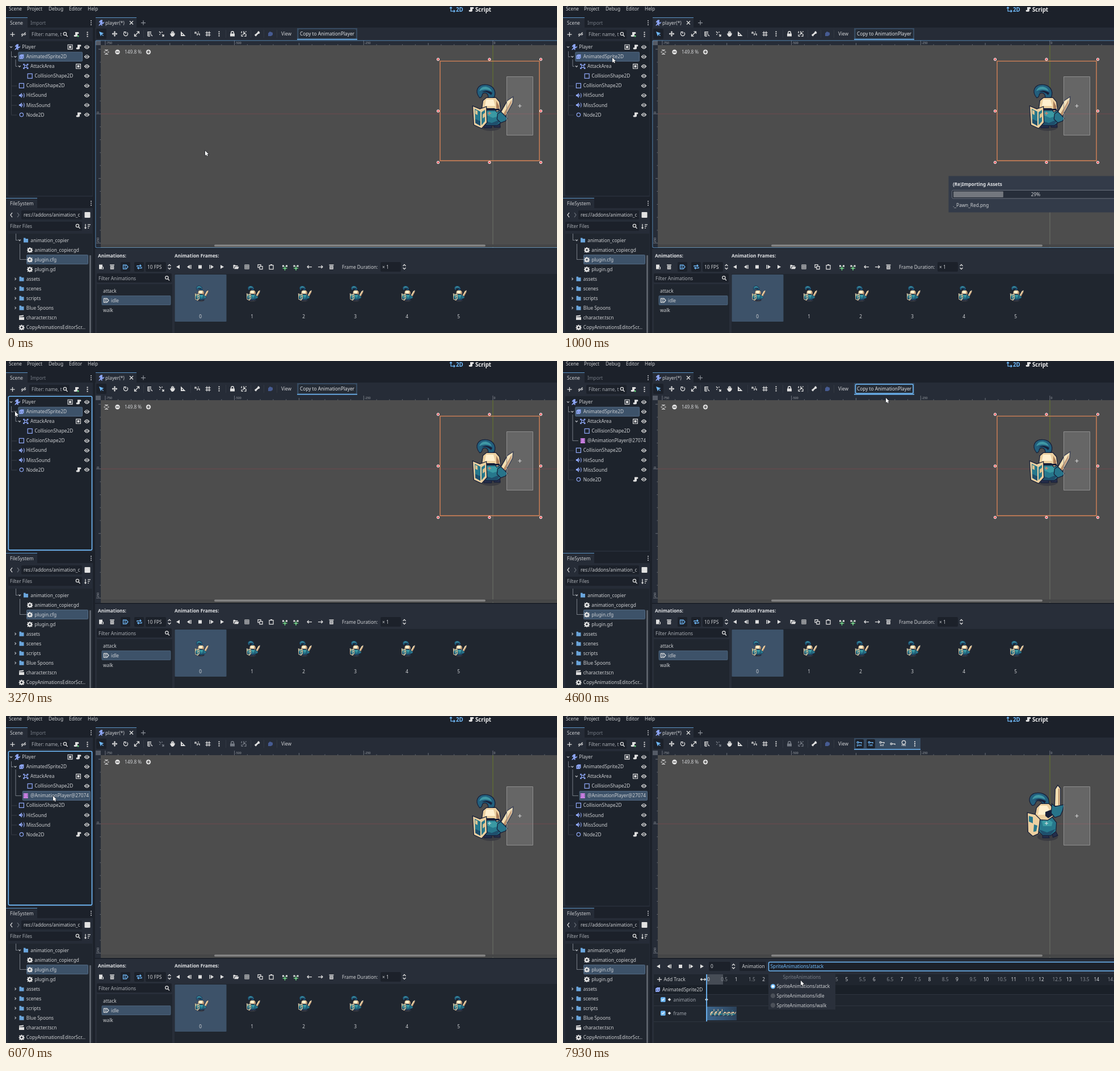
Write an HTML page with a canvas that moves like this. It is 971 px wide and 576 px high and loops after 8 s.

```html
<!DOCTYPE html>
<html lang="en">
<head>
<meta charset="utf-8">
<title>Editor walkthrough</title>
<style>
html, body { margin: 0; width: 100%; height: 100%; overflow: hidden; background: #1c212a }
canvas { display: block }
</style>
</head>
<body>
<canvas id="stage" width="971" height="576"></canvas>
<script>
const g = document.getElementById('stage').getContext('2d');
const LOOP = 8000, STEP = 1000 / 15;
const OUTER = '#1c212a', PANEL = '#262c37', DARK = '#1d232c', LOWER = '#20262f', TEXT = '#cdcfd2', ICON = '#e0e0e0',
  DIM = '#747a84', BLUE = '#70bafa', NODE = '#8da5f3', SELECT = '#3d5269', FOLDER = '#6aa5dc', TAB_LINE = '#5b94c6';
const FONT = '8.29px "Noto Sans", sans-serif', BOLD = 'bold ' + FONT,
  BIG = 'bold 9.7px "Noto Sans", sans-serif', TINY = '5.2px "Noto Sans", sans-serif';

// Icons are centred on 0,0. A path ending in Z is filled, any other is stroked.
const icons = {
  plus: 'M-4 0H4M0-4V4',
  link: 'M-1 1L-3.5 3.5M1-1L3.5-3.5M-4 1L-1.5-1.5M4-1L1.5 1.5M-1.5 1.5L1.5-1.5',
  search: 'M2-1A2.6 2.6 0 1 1-3.2-1A2.6 2.6 0 1 1 2-1M1.2 1L4 4',
  script: 'M-2-4H3Q5-4 4-1H2V2Q2 4 0 4H-3Q-5 4-4 1H-2Z',
  dots: 'M-1-4.5h2v2h-2ZM-1-1h2v2h-2ZM-1 2.5h2v2h-2Z',
  eye: 'M-4.8 0Q0-7 4.8 0Q0 7-4.8 0ZM2.4 0A2.4 2.4 0 1 0-2.4 0A2.4 2.4 0 1 0 2.4 0ZM1.2 0A1.2 1.2 0 1 0-1.2 0A1.2 1.2 0 1 0 1.2 0Z',
  group: 'M-4.5-4.5h9v9h-9ZM-3.4-3.4v6.8h6.8v-6.8ZM-2-2h4v4h-4Z',
  rect: 'M-4-4H4V4H-4V-4.6',
  ring: 'M3.2 0A3.2 3.2 0 1 0-3.2 0A3.2 3.2 0 1 0 3.2 0',
  area: 'M-4-2V-4H-2M2-4H4V-2M4 2V4H2M-2 4H-4V2M-2-2H2V2H-2V-2M-4-4L-2-2M4-4L2-2M4 4L2 2M-4 4L-2 2',
  person: 'M-1-5h3v3h-1l2 2 2-2v2l-2 2h-2l1 3h-2l-1-2-2 2h-2l3-4v-2l-2 1v-2Z',
  sprite: 'M-4-2L-1-4H4V2L2 4H-4ZM-2.5 0v1.5h1.2v-1.5ZM1 0v1.5h1.2v-1.5Z',
  sound: 'M-4.5-1.5h2l3-3v9l-3-3h-2ZM1.5-2.5Q4 0 1.5 2.5ZM3-4Q6 0 3 4L4 4Q7 0 4-4Z',
  film: 'M-4-4.5h8v9h-8ZM-3.4-3v1h1v-1ZM-3.4 0v1h1v-1ZM2.4-3v1h1v-1ZM2.4 0v1h1v-1Z',
  down: 'M-2-1L0 1L2-1', right: 'M-1-2L1 0L-1 2', left: 'M2-4L-1 0L2 4', next: 'M-1-4L2 0L-1 4',
  close: 'M-3-3L3 3M3-3L-3 3',
  arrow: 'M-4-4L4.5-1L1 .5L4 3L3 4L.5 1L-1 4.5Z',
  move: 'M0-5L2-2.4H.7V-.7H2.4V-2L5 0L2.4 2V.7H.7V2.4H2L0 5L-2 2.4H-.7V.7H-2.4V2L-5 0L-2.4-2V-.7H-.7V-2.4H-2Z',
  turn: 'M-2-3A3.6 3.6 0 1 0 2.5-2.6M-3.5-3.5H0V0',
  scale: 'M0-4H4V0M4-4L-4 4M-4 0V4H0',
  list: 'M-4-3.5H2M-4-1H2M-4 1.5H0M-4 4H0M-4-4V4M1 1L4 4',
  pivot: 'M-4-4L-1-1M1-4V-2M-4 1H-2M1 1L4 4M4 1V4H1',
  hand: 'M-4 0l1-1 1 1v-4h1.3v3h.5v-4h1.4v4h.5v-3h1.3v4l.6-1.5h1V1Q3 5 0 5Q-2 5-4 0Z',
  ruler: 'M-4-4.5L4.5 4H-4ZM-2-.5V2H.5Z',
  snap: 'M-4 0v-3h2v3M0 3V0h4v3M2-4v2',
  grid: 'M-4.5-2H4.5M-4.5 2H4.5M-2-4.5V4.5M2-4.5V4.5',
  lock: 'M-4-.5h1v-1.5a3 3 0 0 1 6 0v1.5h1v5h-8ZM-1.6-.5h3.2v-1.5a1.6 1.6 0 0 0-3.2 0Z',
  ungroup: 'M-4-4h1M-1-4h2M3-4h1v1M-4-4v3M4 0v4h-3M-4 1v3h3M-2 2L2-2M-1-2H2V1',
  bone: 'M1-4Q4-6 4-3Q6-2 3.5 0L2 0L-1 3Q-1 5-3 4Q-5 3-4 1L-2 0L1-3Z',
  poly: 'M-4-1L-1-4L4-2V2L1 4H-4Z',
  focus: 'M-4.5 0H-1.8M4.5 0H1.8M0-4V-1.5M0 4V1.5M-3-3.5H3M-3 3.5H3',
  gear: 'M-1-4.5h2v1.2l1.4.6 1-.9 1.3 1.3-1 1 .5 1.3h1.1v1.6H4L3.5 2.6l1 1-1.2 1.2-1.1-.9L1 4.4v.6h-2v-.6l-1.2-.5-1.1.9-1.2-1.2 1-1L-4 1.3h-1v-1.6h1l.5-1.2-1-1 1.3-1.3 1 .9L-1-3.3ZM1.6.2A1.6 1.6 0 1 0-1.6.2A1.6 1.6 0 1 0 1.6.2Z',
  folder: 'M-4-4H-.5V-2.5H4V4H-4Z',
  clap: 'M-4.5-3.5L3.5-4.5V-2.5L-4.5-1.5ZM-4.5-1H4.5V4H-4.5Z',
  sort: 'M-4-4V4M-5.5 2L-4 4L-2.5 2M0-3H5M0 0H3.5M0 3H2',
  add: 'M-4-4H2V0H4V4H-4ZM1 1V3H3V1Z',
  trash: 'M-4-4h8v1.4h-8ZM-3.2-1.8h6.4v6h-6.4ZM-1.6-.8v4h.8v-4ZM.8-.8v4h.8v-4Z',
  tag: 'M-4-3.5H1.5L4.5 0L1.5 3.5H-4V-4M-2-1.3H1M-2 1.3H1',
  loop: 'M-4 0V-2H3M1-4L3-2L1 0M4 0V2H-3M-1 0L-3 2L-1 4',
  back: 'M3-3.5V3.5L-3 0Z', play: 'M-3-3.5V3.5L3 0Z',
  stepBack: 'M1-3.5V3.5L-4 0ZM2-3.5h1.5v7h-1.5Z', step: 'M-1-3.5V3.5L4 0ZM-3.5-3.5h1.5v7h-1.5Z',
  stop: 'M-3-3H3V3H-3Z', open: 'M-4.5-3.5h3l1 1h4v1.5h-5.5l-1.5 4h-1ZM-1-.3H5.5L4 3.8H-3Z',
  table: 'M-4-4h8v8h-8ZM-3-3v1.6h1.6v-1.6ZM-.8-3v1.6h1.6v-1.6ZM1.4-3v1.6h1.6v-1.6ZM-3-.8v1.6h1.6v-1.6ZM-.8-.8v1.6h1.6v-1.6ZM1.4-.8v1.6h1.6v-1.6ZM-3 1.4v1.6h1.6v-1.6ZM-.8 1.4v1.6h1.6v-1.6ZM1.4 1.4v1.6h1.6v-1.6Z',
  copy: 'M-1-1H4V4H-1V-1.6M-1 1H-4V-4H1V-1', paste: 'M-3.5-3H3.5V4H-3.5V-3.6M-1.5-4H1.5',
  insert: 'M-4.5-3h3v3h-3ZM1.5-3h3v3h-3ZM-.7 1h1.4v1.2h1.3v1.4h-1.3v1.2h-1.4v-1.2h-1.3v-1.4h1.3Z',
  toLeft: 'M4 0H-4M-1.5-2.5L-4 0L-1.5 2.5', toRight: 'M-4 0H4M1.5-2.5L4 0L1.5 2.5',
  both: 'M-4 0H4M-2.4-2L-4.4 0L-2.4 2M2.4-2L4.4 0L2.4 2',
  spin: 'M-2.5-1.5L0-4L2.5-1.5M-2.5 1.5L0 4L2.5 1.5',
  gem: 'M0-2.8L2.8 0L0 2.8L-2.8 0Z', key: 'M-4 0A1.5 1.5 0 1 0-1 0A1.5 1.5 0 1 0-4 0M-1 0H4V2',
  check: 'M-2-.2L-.6 1.4L2.2-1.8', axes: 'M-3-4V3H4M-5-2L-3-4L-1-2M2 1L4 3L2 5',
  mouse: 'M0 0V8.4L2 6.7L3.3 9.4L4.7 8.7L3.5 6H6Z'
};
const shapes = {};
for (const n in icons) shapes[n] = new Path2D(icons[n]);

function box(x, y, w, h, fill, line, r = 0) {
  g.beginPath(); g.roundRect(x, y, w, h, r);
  if (fill) { g.fillStyle = fill; g.fill() }
  if (line) { g.strokeStyle = line; g.stroke() }
}
function text(s, x, y, color = TEXT, font = FONT, align = 'left') {
  g.font = font; g.fillStyle = color; g.textAlign = align; g.fillText(s, x, y + 3);
}
function icon(name, x, y, color = ICON) {
  g.save(); g.translate(x, y); g.lineWidth = 1.25;
  g.fillStyle = g.strokeStyle = color;
  icons[name].endsWith('Z') ? g.fill(shapes[name], 'evenodd') : g.stroke(shapes[name]);
  g.restore();
}
const iconRow = (y, row, color) => { for (const n in row) [].concat(row[n]).forEach(x => icon(n, x, y, color)) };
function disc(x, y, r, fill, line) {
  g.beginPath(); g.arc(x, y, r, 0, 7);
  g.fillStyle = fill; g.fill();
  if (line) { g.strokeStyle = line; g.stroke() }
}
function tab(x, y, w, label) {
  box(x, y, w, 18, PANEL); box(x, y, w, 1, TAB_LINE);
  text(label, 7, y + 9.5);
}

const INK = '#182039', TEAL = '#27788c', CREAM = '#ecd0a0';
// Layers of colour and path; a third value leaves out the dark outline.
const poses = [[
  ['#252e4b', 'M842 207H855V214H843ZM860 207H870V213H861Z'],
  ['#235f7d', 'M835 161C826 150 832 139 844 139C857 139 864 149 860 160L850 163C852 155 846 151 841 153C837 155 840 160 835 161Z'],
  ['#3f97a4', 'M834 150Q837 141 846 142Q854 144 856 150Q844 144 834 150Z', 1],
  [INK, 'M838 152Q846 146 857 153L855 157Q847 149 838 152Z', 1],
  [TEAL, 'M839 188L846 181H868L875 190L873 204L865 210H847L840 203Z'],
  ['#3a9aa3', 'M844 186H866L871 193L858 197L846 192Z', 1],
  ['#1f4f6c', 'M841 201L856 206L873 199L865 210H847Z', 1],
  [CREAM, 'M839 182L841 167L847 162H863L869 169L871 183L865 186L861 180H847Z'],
  ['#fff0cf', 'M846 165H859L862 176H844Z', 1],
  ['#a77b59', 'M864 167L869 176V183L864 180Z', 1],
  [INK, 'M841 181H870V184H841Z', 1],
  [CREAM, 'M823 177L835 182L846 178L847 205L838 215L825 209Z'],
  [TEAL, 'M826 181L836 186V211L827 206ZM838 187L844 183V203L838 210Z', 1],
  ['#d9c08f', 'M827 183L831 185V192L827 190ZM840 191L844 188V195L840 198Z', 1],
  ['#1f4f6c', 'M827 199L836 203V211L827 206Z', 1],
  ['#f3deb1', 'M871 190L884 167L893 161L892 171L879 195Z'],
  ['#b98e68', 'M876 191L891 165V171L879 194Z', 1],
  ['#27748a', 'M867 190L872 187L883 198L880 202L872 205L866 199Z']
], [
  ['#252e4b', 'M846 206H853L856 214H846ZM862 204H868L871 210L864 213Z'],
  ['#235f7d', 'M827 157C818 147 824 136 837 136C850 136 857 144 856 156L846 160C847 152 841 147 835 149C831 151 833 157 827 157Z'],
  ['#3f97a4', 'M827 147Q830 138 839 139Q848 140 850 147Q837 141 827 147Z', 1],
  [INK, 'M831 149Q839 143 851 150L849 154Q840 146 831 149Z', 1],
  [TEAL, 'M838 187L845 179H862L869 188L868 203L859 210H846L838 202Z'],
  ['#3a9aa3', 'M844 186L852 180L863 187L861 194H846Z', 1],
  ['#1f4f6c', 'M839 200L853 205L868 199L859 210H846Z', 1],
  [CREAM, 'M832 177L835 162L842 155H856L863 162L864 176L854 183L838 182Z'],
  ['#fff0cf', 'M840 158H853L857 165L848 174H837Z', 1],
  [INK, 'M850 169L863 164V175L855 180L850 176Z', 1],
  [CREAM, 'M819 171L832 174L840 182L837 207L828 211L820 204Z'],
  [TEAL, 'M821 176L828 178V189L821 186ZM830 191L836 193L834 203L829 204Z', 1],
  ['#f3deb1', 'M867 158L868 129L872 123L876 128V158Z'],
  ['#b98e68', 'M873 128H875V157H873Z', 1],
  ['#27748a', 'M862 156L867 160L882 157L880 166L876 175L867 178L861 171Z']
]].map(p => p.map(([color, d, plain]) => [color, new Path2D(d), plain]));

function knight(x, y, scale, pose = 0) {
  g.save();
  g.translate(x, y); g.scale(scale, scale); g.translate(-856, -180);
  g.fillStyle = '#3b3c42';
  g.beginPath(); g.ellipse(854, 213, 18, 7, 0, 0, 7); g.fill();
  g.lineWidth = 2.6; g.strokeStyle = INK;
  for (const [color, path, plain] of poses[pose]) {
    if (!plain) g.stroke(path);
    g.fillStyle = color; g.fill(path);
  }
  g.restore();
}

function cross(x, y, color) {
  box(x - 3, y - .5, 6, 1, color); box(x - .5, y - 3, 1, 6, color);
}

function topBar() {
  box(0, 0, 971, 576, OUTER);
  [['Scene', 5], ['Project', 37], ['Debug', 75], ['Editor', 111], ['Help', 144]].forEach(([s, x]) => text(s, x, 5.4));
  icon('axes', 787, 6, BLUE); text('2D', 793, 6.5, BLUE, BIG);
  icon('script', 820, 6); text('Script', 827, 6.5, '#f0f0f0', BIG);
}

// name, icon, depth, colour, has arrow, extra icons
function sceneRows(s) {
  const rows = [
    ['Player', 'person', 0, NODE, 1, { group: 113, script: 128 }],
    ['AnimatedSprite2D', 'sprite', 1, NODE, 1, {}],
    ['AttackArea', 'area', 2, NODE, 1, { group: 127.5 }],
    ['CollisionShape2D', 'rect', 3, NODE, 0, {}],
    ['@AnimationPlayer@27074', 'film', 2, '#c77ddf', 0, null],
    ['CollisionShape2D', 'rect', 1, NODE, 0, {}],
    ['HitSound', 'sound', 1, NODE, 0, {}],
    ['MissSound', 'sound', 1, NODE, 0, {}],
    ['Node2D', 'ring', 1, NODE, 0, { script: 128 }]
  ];
  return rows.filter((r, i) => !(i == 4 && !s.added) && !(s.collapsed && r[2] > 1));
}

function sceneDock(s) {
  box(0, 38, 153, 298, PANEL); tab(0, 20, 38, 'Scene');
  text('Import', 43, 29.5, DIM); icon('dots', 150, 29.5, '#9a9da3');
  icon('plus', 11.5, 50); icon('link', 31, 50);
  box(41, 42, 71, 16, OUTER, null, 2); text('Filter: name, t', 45, 50, '#a9adb3');
  icon('search', 104.5, 50); icon('script', 124, 50); disc(127, 53, 1.6, '#63d27a'); icon('dots', 143.5, 50);
  box(4, 62, 148, 272, DARK, null, 2);
  const rows = sceneRows(s), rowY = i => 72.2 + 17.05 * i, last = rowY(rows.length - 1);
  g.lineWidth = 1;
  box(9, 79, 1, last - 79, '#363c45');
  rows.forEach(([name, pic, depth, color, arrow, extra], i) => {
    const y = rowY(i), x = 20 + 7.4 * depth, left = x - 5.5;
    if (depth == 1) box(9, y, arrow ? 4 : 10, 1, '#363c45');
    if (i && name == (s.picked ? '@AnimationPlayer@27074' : 'AnimatedSprite2D'))
      box(left, y - 8, (extra ? 134.5 : 148.5) - left, 16, SELECT, '#536b85', 1);
    if (arrow) icon(s.collapsed && i == 1 ? 'right' : 'down', x - 11, y, '#aeb2b8');
    icon(pic, x, y, color);
    text(name, x + 8.3, y);
    if (extra) { iconRow(y, extra); icon('eye', 142.5, y) }
  });
  if (!s.collapsed) {
    const end = rowY(s.added ? 4 : 2);
    box(16.5, rowY(1) + 5, 1, end - rowY(1) - 5, '#777d86');
    box(17, end - .5, s.added ? 10 : 3, 1, '#777d86');
  }
  box(9, 80, 1, 10, '#777d86'); box(9, 89, 4, 1, '#777d86');
  g.lineWidth = 1.6;
  if (s.treeFocus) box(4.3, 62.3, 147.2, 270.8, null, BLUE, 2);
}

function fileDock() {
  box(0, 356, 153, 220, PANEL); tab(0, 338, 55, 'FileSystem'); icon('dots', 150, 347.5, '#9a9da3');
  icon('left', 9, 368); icon('next', 21, 368, '#656b75');
  box(27, 360, 107, 16, OUTER, null, 2); text('res://addons/animation_c', 31, 368);
  box(138.5, 363, 10, 10, '#e2e2e2', null, 1);
  box(4, 380, 130, 16, OUTER, null, 2); text('Filter Files', 7, 388, '#a9adb3');
  icon('search', 126.5, 388); icon('sort', 144, 388);
  box(4, 401, 148, 175, LOWER);
  box(147, 439, 3, 137, '#5a6069', null, 1);
  const dirs = ['assets', 'scenes', 'scripts', 'Blue Spoons'];
  const files = ['animation_copier', 'animation_copier.gd', 'plugin.cfg', 'plugin.gd', ...dirs,
    'character.tscn', 'CopyAnimationsEditorScr...'];
  box(17, 401, 1, 12, '#777d86'); box(17, 412, 4, 1, '#777d86');
  box(24, 419, 1, 28, '#777d86'); box(24, 446, 12, 1, '#777d86');
  g.lineWidth = 1;
  files.forEach((name, i) => {
    const y = 412.5 + 17.05 * i, x = i == 0 ? 35 : i < 4 ? 42 : 27.5;
    if (i == 2) box(36.5, y - 8, 108, 16, SELECT, '#536b85', 1);
    const dir = i == 0 || dirs.includes(name);
    if (dir) icon(i ? 'right' : 'down', x - 11, y, '#aeb2b8');
    icon(dir ? 'folder' : i == 8 ? 'clap' : 'gear', x, y, dir ? FOLDER : ICON);
    text(name, x + 8.3, y);
  });
}

function toolbar(s) {
  box(157, 38, 814, 388, PANEL); box(158, 20, 72, 18, PANEL); box(158, 20, 72, 1, TAB_LINE);
  icon('person', 168, 29.5, NODE); text('player(*)', 175, 29.5); icon('close', 221, 29.5);
  icon('plus', 242, 29.5, '#8a8f97');
  box(159, 40, 18, 18, OUTER, null, 2); icon('arrow', 168, 49, BLUE);
  iconRow(49, { move: 191.5, turn: 211, scale: 230.5, list: 254, hand: 293, ruler: 312, snap: 337, grid: 356, dots: 375.5, bone: 442.5 });
  icon('pivot', 274, 49, s.picked ? DIM : ICON);
  iconRow(49, { lock: 399, ungroup: 419 }, s.picked ? DIM : ICON);
  icon('poly', 466, 49, '#465b91'); text('View', 485, 49);
  [242, 325, 387, 431, 454, 477].forEach(x => box(x, 42, 1, 14, '#323842'));
  if (s.picked && !s.anim) return;
  const w = s.anim ? 117 : 106;
  box(513, 39, w, 20, '#364a60'); box(513, 58, w, 1.5, BLUE);
  if (s.anim) {
    box(515, 41, 15, 16, OUTER, null, 2); box(535, 41, 15, 16, OUTER, null, 2);
    [['pos', 522, BLUE], ['rot', 542, BLUE], ['scl', 562, ICON], ['rec', 600.5, ICON]].forEach(([n, x, c]) => {
      icon(n == 'rec' ? 'ring' : 'key', x, 46.5, c);
      text(n, x, 50, c, 'bold ' + TINY, 'center');
    });
    icon('key', 581, 49); icon('dots', 620, 49);
  } else {
    g.lineWidth = 1.5;
    box(515.5, 41, 101.5, 16, s.pressed ? '#14181f' : s.hover ? '#303844' : '#252c36', s.copyFocus && BLUE, 2);
    text('Copy to AnimationPlayer', 518, 49, s.pressed ? BLUE : '#e0e2e5');
  }
}

function viewport(s) {
  box(167, 69, 804, 357, '#4d4d4d');
  box(158, 61, 813, 8, PANEL); box(158, 61, 9, 365, PANEL);
  const unit = 22.77, mark = '#6c717a';
  for (let i = -30; i < 6; i++) {
    const x = 858 + i * unit, size = i % 10 == 0 ? 8 : i % 5 == 0 ? 4 : 1.5;
    if (x > 167) box(x - .5, 69 - size, 1, size, mark);
    if (i % 10 == 0) text(String(i * 25), x + 1.5, 64, '#a5a9af', TINY);
  }
  for (let j = -5; j < 11; j++) {
    const y = 190 + j * unit, size = j % 10 == 0 ? 8 : j % 5 == 0 ? 4 : 1.5;
    if (y > 69) box(167 - size, y - .5, size, 1, mark);
    if (j % 10 == 0) {
      g.save(); g.translate(162, y - 1); g.rotate(-Math.PI / 2);
      text(String(j * 25), 0, -1, '#a5a9af', TINY); g.restore();
    }
  }
  box(158, 61, 9, 8, '#555b66');
  box(167, 189.5, 804, 1, '#6f4a4e');
  box(857.5, 69, 1, 121, '#66792b'); box(857.5, 190, 1, 236, '#6d7268');
  knight(856, 180, 1, s.attack ? 1 : 0);
  g.lineWidth = 1;
  box(882.5, 124.5, 46, 103, 'rgba(255,255,255,.14)', '#8f8f8f');
  cross(905.5, 176, '#d8d8d8');
  cross(852, 189, s.picked ? '#e8e8e8' : '#ff7a5c');
  if (!s.picked) {
    g.lineWidth = 1.3; box(765, 97.2, 175, 175.3, null, '#dc8557');
    g.lineWidth = 1;
    for (const x of [761.5, 852, 942.5]) for (const y of [94, 185, 275.5])
      if (x != 852 || y != 185) disc(x, y, 2.2, '#ff5a5f', '#fff');
  }
  icon('focus', 177, 81);
  disc(196.5, 81, 4.2, ICON); box(194, 80.4, 5, 1.3, '#4d4d4d');
  text('149.8 %', 209, 81);
  disc(251, 81, 4.2, ICON); box(248.5, 80.4, 5, 1.3, '#4d4d4d'); box(250.4, 78.5, 1.3, 5, '#4d4d4d');
  box(167, 420, 804, 4.5, '#454647'); box(367, 420.3, 478, 3.4, '#858585', null, 2);
  g.lineWidth = 1.2;
  if (s.viewFocus) box(157.8, 60.8, 820, 364.8, null, 'rgba(112,186,250,.5)', 2);
}

function spritePanel() {
  text('Animations:', 162, 440, '#e0e2e5', BOLD); text('Animation Frames:', 297, 440, '#e0e2e5', BOLD);
  box(202, 451, 17, 17, OUTER, null, 2); box(226, 451, 17, 17, OUTER, null, 2);
  iconRow(459.5, { tag: 210.5, loop: 235 }, BLUE);
  box(246, 451, 36, 17, OUTER, null, 2); text('10 FPS', 249, 459.5);
  box(660, 451, 36, 17, OUTER, null, 2); text('× 1', 663, 459.5);
  iconRow(459.5, { add: 168, trash: [187, 573.5], spin: [288, 702], back: 303, stepBack: 323, stop: 342, step: 362,
    play: 381, open: 405, table: 424.5, copy: 448, paste: 467.5, insert: [491.5, 511], toLeft: 535, toRight: 554 });
  [491.5, 511].forEach(x => icon('plus', x, 462, '#63d27a'));
  text('Frame Duration:', 592, 459.5);
  box(160, 471, 132, 16, OUTER, null, 2); text('Filter Animations', 163, 479.5, '#a9adb3'); icon('search', 284, 479.5);
  box(160, 490, 133, 86, LOWER); box(297, 472, 674, 104, LOWER);
  g.lineWidth = 1; box(169, 510.5, 121, 16, SELECT, '#4a6078', 1);
  text('attack', 171, 501.5); icon('tag', 176.5, 518.5); text('idle', 185, 518.5); text('walk', 171, 535.5);
  box(297.5, 473, 91, 83, SELECT, null, 1);
  for (let i = 0; i < 6; i++) {
    knight(344 + 91 * i, 507, .34);
    text(i, 342.5 + 91 * i, 546.5, TEXT, FONT, 'center');
  }
}

function animPanel(s) {
  iconRow(441, { back: 168, stepBack: 187.5, stop: 207, step: 225.5, play: 245, spin: 300.5 });
  box(257, 433, 38, 16, OUTER, null, 2); text('0', 260, 441);
  box(311, 433, 47, 16, OUTER, null, 2); text('Animation', 315.5, 441);
  g.lineWidth = 1.5;
  box(362.5, 433.5, 620, 15.5, OUTER, s.menuFocus && BLUE, 2);
  text('SpriteAnimations/attack', 365.5, 441, s.menuFocus ? BLUE : TEXT);
  box(160, 455, 811, 121, LOWER);
  box(160, 455, 811, 18, '#20262f'); box(253, 455, 29, 18, '#464c55');
  icon('plus', 170, 464); text('Add Track', 177.5, 464); icon('both', 247, 464);
  for (let i = 0; i < 30; i++)
    text(i / 2, 254 + 24.34 * i, 464, i % 2 ? '#888d95' : '#d2d4d8');
  box(160, 474, 811, 16, '#1a2028');
  icon('sprite', 167, 482, NODE); text('AnimatedSprite2D', 175, 482);
  [490, 510, 538].forEach(y => box(160, y, 811, 1, '#2e353f'));
  [['animation', 499.5], ['frame', 523.5]].forEach(([name, y]) => {
    box(172, y - 4.3, 8.6, 8.6, BLUE, null, 1.5); icon('check', 176.3, y, '#fff');
    icon('gem', 187.5, y); text(name, 194.5, y, '#a0a5ad');
  });
  icon('gem', 253, 499.5);
  const strip = g.createLinearGradient(254, 0, 306, 0);
  strip.addColorStop(0, '#3d668d'); strip.addColorStop(1, '#2b4159');
  box(254, 512, 52, 24, strip);
  for (let i = 0; i < 6; i++) knight(264 + 7.2 * i, 523.5, .13, i < 3 ? 1 : 0);
  box(252.2, 455, 1.8, 83, BLUE);
  if (!s.menu) return;
  box(362, 452, 118, 65, '#2a303b');
  text('SpriteAnimations', 421, 460, '#767c86', FONT, 'center');
  ['attack', 'idle', 'walk'].forEach((n, i) => {
    const y = 476.3 + 16.6 * i;
    disc(370, y, 4.2, i ? '#4b5059' : BLUE);
    if (!i) disc(370, y, 2.2, '#fff');
    text('SpriteAnimations/' + n, 376.5, y);
  });
}

function importBox(done) {
  g.lineWidth = 1;
  box(679.5, 299.5, 300, 64, '#333b49');
  text('(Re)Importing Assets', 687, 313.5, '#e0e2e5', BOLD);
  box(685.5, 324.5, 300, 14.5, '#272e3a', '#6a717d', 2);
  box(688, 326.5, 303 * done, 10.5, '#73777e', null, 1);
  text(Math.round(done * 100) + '%', 833, 331.7, TEXT, FONT, 'center');
  text('._Pawn_Red.png', 687, 350.5);
}

// time, x, y of the pointer
const path = [[0, 351, 255], [133, 186, 139], [267, 186, 139], [667, 87, 91], [1532, 87, 91], [1533, 86, 91],
  [1732, 86, 91], [1733, 87, 91], [2400, 87, 91], [2867, 16, 89], [3267, 16, 89], [4067, 566, 47], [4467, 566, 47],
  [4600, 569, 65], [5333, 82, 139], [5399, 82, 139], [5400, 82, 140], [5599, 82, 140], [5600, 83, 141],
  [6133, 83, 141], [6867, 256, 468], [7000, 257, 476], [7600, 412, 440], [7866, 412, 440], [7933, 419, 466], [8001, 419, 466]];

function pointer(t) {
  const i = path.findIndex(p => p[0] > t), a = path[i - 1], b = path[i];
  const u = (t - a[0]) / (b[0] - a[0]), e = u * u * (3 - 2 * u);
  return [a[1] + (b[1] - a[1]) * e, a[2] + (b[2] - a[2]) * e];
}

function draw(t) {
  const on = (from, to = LOOP) => t >= from - 2 && t < to - 2;
  const s = {
    treeFocus: on(2133, 3533) || on(6067, 6333), collapsed: on(2933, 3267), added: on(4333),
    viewFocus: on(0, 2133) || on(3533, 4267) || on(4667, 6067) || on(6333, 6933),
    hover: on(4000, 4533), pressed: on(4267, 4333), copyFocus: on(4267, 4667), picked: on(6067),
    anim: on(6133), attack: on(6933), menuFocus: on(7667), menu: on(7733)
  };
  topBar(); sceneDock(s); fileDock(); toolbar(s); viewport(s);
  box(157, 428, 814, 148, '#282e39');
  s.anim ? animPanel(s) : spritePanel();
  if (on(600, 1200)) importBox(.29 + (t - 1000) * .0006);
  const [x, y] = pointer(t);
  g.save(); g.translate(Math.round(x), Math.round(y));
  g.lineWidth = 1.2; g.strokeStyle = '#22252b'; g.fillStyle = '#fff';
  g.stroke(shapes.mouse); g.fill(shapes.mouse); g.restore();
}

function tick() {
  const t = (performance.now() + 5) % LOOP;
  draw(Math.floor(t / STEP) * STEP);
  requestAnimationFrame(tick);
}
tick();
</script>
</body>
</html>
```
